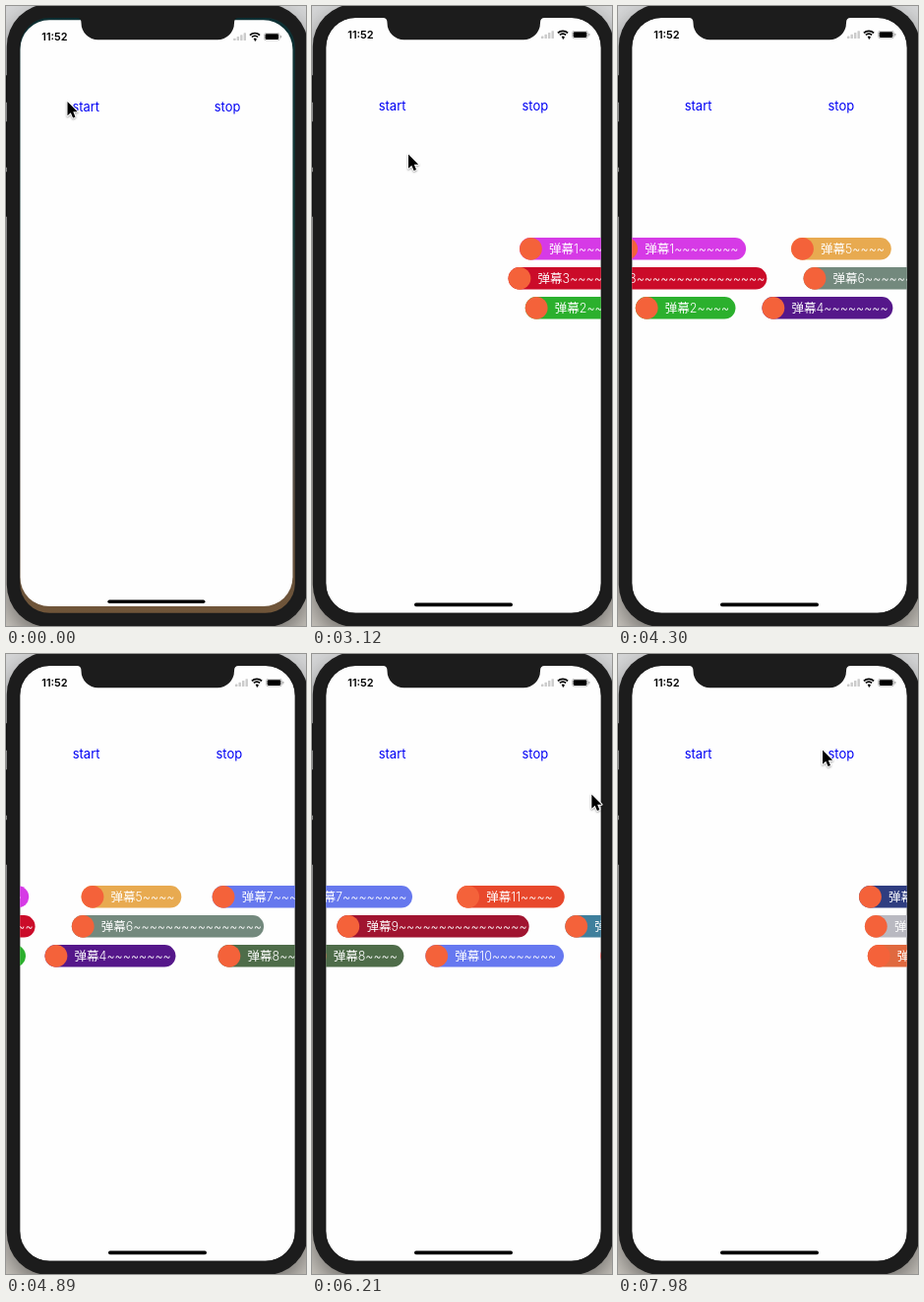
Recreate the animation shown at these times as an HTML page with a canvas. Size 305x629 px, loop 8 s.

```html
<!DOCTYPE html>
<html lang="en">
<head>
<meta charset="utf-8">
<style>
  html, body { margin: 0; width: 100%; height: 100%; overflow: hidden; background: #d2d1cd; }
  canvas { display: block; }
</style>
</head>
<body>
<canvas id="stage" width="305" height="629"></canvas>
<script>
const ctx = document.getElementById('stage').getContext('2d');
const LOOP = 8000, STEP = 147.4, OFFSET = 18;
const CROSS = 2480, GAP = 37.2, STOP = 6790;
const LEFT = 14.2, RIGHT = 293.8, TOP = 12, BOTTOM = 615.7;
const WIDTH = RIGHT - LEFT;
const FONT = 'Inter, "Noto Sans CJK SC", "Noto Sans CJK", sans-serif';
const BLACK = '#1c1c1c', BLUE = '#0000f4';

// Each bullet takes the row that clears first; all need the same time to cross.
function schedule(from, until, first, tildes, colors) {
  const free = [from, from, from];
  const list = [];
  for (let i = 0; i < colors.length; i++) {
    let row = 0;
    for (const r of [2, 1]) if (free[r] < free[row] - 1) row = r;
    const start = free[row], num = first + i, count = tildes[i % 3];
    if (start >= until) break;
    const w = 62.7 + 7.8 * (count + String(num).length);
    const speed = (WIDTH + w + GAP) / CROSS;
    free[row] = start + (w + GAP) / speed;
    list.push({ text: '弹幕' + num + '~'.repeat(count), row, start, until, w, speed, color: colors[i] });
  }
  return list;
}

const bullets = [
  ...schedule(2657, STOP, 1, [8, 4, 16], [
    '#d63ae6', '#2bb02d', '#cb0b29', '#55178a', '#e8aa50', '#73897d', '#6678ee',
    '#4e6c49', '#a01430', '#6678f0', '#e8482c', '#3f7f9c', '#8a5ab0', '#c08a3c'
  ]),
  ...schedule(7745, LOOP, 15, [16, 4, 8], ['#2f3d80', '#e0693f', '#b9b9c1'])
];

// pointer legs: leave, arrive, x, y
const legs = [
  [0, 0, 62.5, 97],
  [150, 1050, 134, 246],
  [1350, 1490, 96, 147.5],
  [1500, 2530, 78, 102],
  [2690, 3110, 98, 150.5],
  [3120, 3930, 310, 160],
  [5950, 6660, 225, 102],
  [7000, 7540, 71, 102],
  [7690, 7975, 208, 97.5]
];

const ease = k => k * k * (3 - 2 * k);

function pointerAt(t) {
  let x = 0, y = 0;
  for (const [leave, arrive, tx, ty] of legs) {
    if (t < leave) break;
    const k = t >= arrive ? 1 : ease((t - leave) / (arrive - leave));
    x += (tx - x) * k;
    y += (ty - y) * k;
  }
  return [x, y];
}

function box(x, y, w, h, r, fill) {
  ctx.beginPath();
  ctx.roundRect(x, y, w, h, r);
  ctx.fillStyle = fill;
  ctx.fill();
}

function label(text, x, y, style, color, align = 'left') {
  ctx.font = style + ' ' + FONT;
  ctx.textAlign = align;
  ctx.fillStyle = color;
  ctx.fillText(text, x, y);
}

function backdrop(...colors) {
  const g = ctx.createLinearGradient(0, 0, 0, 629);
  colors.forEach((c, i) => g.addColorStop(i / (colors.length - 1), c));
  ctx.fillStyle = g;
  ctx.fillRect(0, 0, 305, 629);
}

function drawBody() {
  backdrop('#d6d7d8', '#cdc9c2');
  for (const [y, h] of [[70, 28], [117, 47], [168, 46]]) box(0, y, 3, h, 1, '#161616');
  ctx.save();
  ctx.shadowColor = 'rgba(0,0,0,.45)';
  ctx.shadowBlur = 24;
  ctx.shadowOffsetY = 10;
  box(0.8, -2, 306.4, 632, 43, BLACK);
  ctx.restore();
}

function drawStatus() {
  label('11:52', 36.3, 33, '600 11px', '#000');
  for (let i = 0; i < 4; i++) box(233 + i * 3.5, 30.6 - i * 1.8, 2.4, 2.4 + i * 1.8, 0.6, '#cbcbcb');

  ctx.strokeStyle = ctx.fillStyle = '#000';
  ctx.lineWidth = 1.7;
  for (const r of [1.2, 4.4, 7.2]) {
    ctx.beginPath();
    ctx.arc(255, 32.5, r, Math.PI * 1.25, Math.PI * 1.75);
    if (r < 2) ctx.lineTo(255, 33.3);
    ctx.stroke();
  }

  box(264.3, 25, 16.4, 8.2, 2.4, '#a8a8a8');
  box(264.9, 25.6, 15.2, 7, 2, '#fff');
  box(265.6, 26.2, 13.8, 5.8, 1.4, '#000');
  box(281.3, 27.8, 1, 2.6, 0.5, '#a0a0a0');
}

function drawApp(bottom) {
  box(LEFT, TOP, WIDTH, bottom - TOP, 30, '#fefefe');
  drawStatus();
  label('start', 81.6, 106, '400 13px', BLUE, 'center');
  label('stop', 226.8, 106, '400 13px', BLUE, 'center');
  box(104, 605.6, 100, 3.6, 1.8, '#000');
}

function drawBullet({ text, row, start, until, w, speed, color }, t) {
  const x = RIGHT - speed * (t - start);
  if (t < start || t >= until || x + w < LEFT) return;
  const y = 235.1 + row * 30;
  box(x, y, w, 22.4, 11.2, color);
  box(x, y - 0.2, 22.8, 22.8, 11.4, '#f4623a');
  label(text, x + 30, y + 16, '300 12.5px', '#fff');
}

function drawNotch() {
  ctx.beginPath();
  ctx.moveTo(72, 11);
  ctx.lineTo(72, 12);
  ctx.quadraticCurveTo(76.5, 12, 76.5, 17);
  ctx.arcTo(76.5, 34.3, 95, 34.3, 17);
  ctx.arcTo(232, 34.3, 232, 17, 17);
  ctx.lineTo(232, 17);
  ctx.quadraticCurveTo(232, 12, 236.5, 12);
  ctx.lineTo(236.5, 11);
  ctx.fillStyle = BLACK;
  ctx.fill();
}

const arrow = new Path2D('M0 0V14.2L3.3 11.2L5.6 16.4L8 15.4L5.8 10.3H10.2Z');

function drawPointer(t) {
  ctx.save();
  ctx.translate(...pointerAt(t));
  ctx.lineJoin = 'round';
  ctx.shadowColor = 'rgba(0,0,0,.35)';
  ctx.shadowBlur = 2;
  ctx.shadowOffsetY = 1;
  ctx.strokeStyle = '#fff';
  ctx.lineWidth = 2;
  ctx.stroke(arrow);
  ctx.shadowColor = 'transparent';
  ctx.fillStyle = '#000';
  ctx.fill(arrow);
  ctx.restore();
}

function draw(now) {
  const time = now % LOOP;
  const t = time < 150 ? 0 : OFFSET + STEP * Math.max(1, Math.floor((time - OFFSET) / STEP));
  const opening = t === 0;
  drawBody();
  ctx.save();
  ctx.beginPath();
  ctx.roundRect(LEFT, TOP, WIDTH, BOTTOM - TOP, 30);
  ctx.clip();
  if (opening) {
    backdrop('#0d2f33', '#123a38', '#4a4a48', '#735638');
    ctx.translate(0.3, 2.4);
    ctx.scale(0.991, 0.991);
  }
  drawApp(opening ? BOTTOM - 3.5 : BOTTOM);
  for (const b of bullets) drawBullet(b, t);
  ctx.restore();
  drawNotch();
  drawPointer(t);
  requestAnimationFrame(draw);
}
requestAnimationFrame(draw);
</script>
</body>
</html>
```
